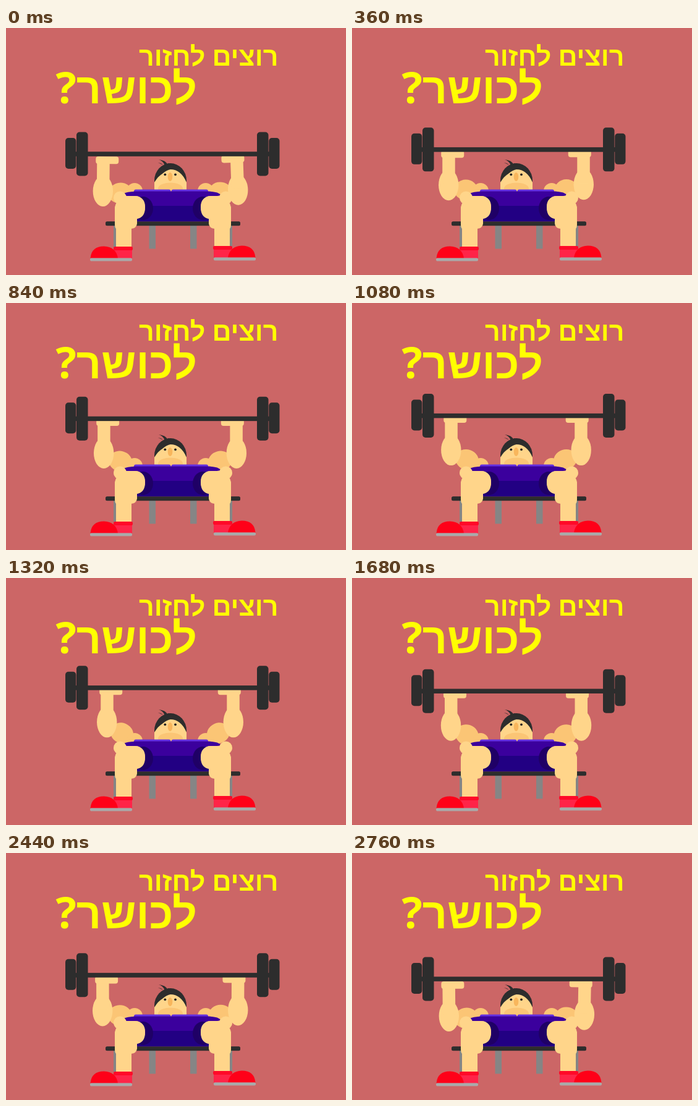
An HTML page that plays this animation: 550x400 px, repeating every 2800 ms.

```html
<!DOCTYPE html>
<html lang="he">
<head>
<meta charset="utf-8">
<style>
html, body { margin: 0; width: 100%; height: 100%; overflow: hidden; background: #c66; }
svg { display: block; width: 550px; height: 400px; }
text { font-family: "Open Sans", "Noto Sans", sans-serif; font-weight: 700; fill: #ff0; direction: rtl; }
.light { fill: #ffd58a; }
.tan { fill: #fbc575; }
.iron { fill: #2d2d2d; }
.steel { fill: #858585; }
</style>
</head>
<body>
<svg viewBox="0 0 550 400">
  <defs>
    <g id="upper">
      <ellipse class="tan bicep" rx="19" ry="16.5"/>
      <circle class="tan" cx="208" cy="264" r="13"/>
    </g>
    <g id="leg">
      <ellipse cx="221.5" cy="292" rx="16.5" ry="19" fill="#1f0066"/>
      <ellipse class="tan" cx="210" cy="290.5" rx="15" ry="18.5"/>
      <circle class="light" cx="184.5" cy="275" r="10.5"/>
      <path class="light" d="M190 272H208Q225 273 225 290Q225 307 212 309V317Q211 324 203 325V357H178V325Q176 323 176 318V290Q178 280 186 277Z"/>
    </g>
    <g id="foot">
      <rect x="176" y="357" width="28" height="16" fill="#ff2448"/>
      <rect x="174" y="354" width="31" height="6" rx="2" fill="#ff0a28"/>
      <path d="M136.5 373Q138 353.500 158.500 353.500Q178 354 181 373Z" fill="#ff0018"/>
      <rect x="136" y="372.500" width="68" height="5" rx="2" fill="#aaa"/>
    </g>
    <g id="plates" class="iron">
      <rect x="96" y="-26" width="17.300" height="50" rx="5"/>
      <rect x="114" y="-35.500" width="18.500" height="71" rx="5"/>
    </g>
    <g id="post" class="steel">
      <rect x="231.500" y="318" width="10.500" height="39.500"/>
      <rect x="174" y="318" width="10" height="39.500"/>
    </g>
  </defs>

  <rect width="550" height="400" fill="#c66"/>
  <text x="440.500" y="61" font-size="43">רוצים לחזור</text>
  <text x="309" y="121.500" font-size="70">לכושר?</text>

  <use href="#post"/>
  <use href="#post" transform="translate(540) scale(-1 1)"/>

  <g id="arms"></g>

  <g id="head">
    <ellipse class="iron" cx="266" cy="247" rx="26" ry="28"/>
    <path class="iron" d="M254 222Q251 218 246 218.500Q252 220 255 223ZM262 222Q258 214 247 213Q255 216 257 223L272 222Q267 219 262 219Z"/>
    <path class="light" d="M240 250Q246 240 253 236Q260 230 266 229Q283 229 292 250V268H240Z"/>
    <ellipse class="tan" cx="266" cy="260" rx="20" ry="9.500"/>
    <ellipse cx="265.500" cy="241" rx="3.800" ry="7" fill="#f8b65c"/>
    <circle cx="257.300" cy="237.300" r="1.900" fill="#222"/>
    <circle cx="274" cy="237.300" r="1.900" fill="#222"/>
  </g>

  <rect class="iron" x="161" y="313.300" width="218" height="7" rx="2.500"/>
  <path d="M190 268Q198 264.500 210 265H330Q344 265 348 271Q335 272 330 280V313H210V280Q205 272 190 272Z" fill="#3b009d"/>
  <rect x="210" y="288" width="120" height="25.300" fill="#220083"/>
  <rect x="207" y="261.500" width="59.500" height="6" rx="3" fill="#6530e0"/>
  <rect x="267.500" y="261.500" width="59.500" height="6" rx="3" fill="#6530e0"/>
  <path d="M200 267Q203 264.500 208 264.500H329Q337 265 340 269H200Z" fill="#3b009d"/>

  <use href="#leg"/>
  <use href="#leg" transform="translate(540) scale(-1 1)"/>
  <use href="#foot"/>
  <use href="#foot" transform="translate(540 -1) scale(-1 1)"/>

  <g id="fore"></g>

  <g id="bar">
    <rect class="iron" x="110" y="-3.700" width="318" height="7.500"/>
    <use href="#plates"/>
    <use href="#plates" transform="translate(538.500) scale(-1 1)"/>
  </g>
</svg>
<script>
const NS = "http://www.w3.org/2000/svg";
const STEP = 40, COUNT = 70, TOP = 34, LIFT = 27;
const byId = id => document.getElementById(id);

function add(parent, tag, attrs) {
  const el = document.createElementNS(NS, tag);
  for (const k in attrs) el.setAttribute(k, attrs[k]);
  return parent.appendChild(el);
}

function makeArm(mirror) {
  const flip = mirror ? { transform: "translate(531) scale(-1 1)" } : {};
  const back = add(byId("arms"), "g", flip);
  const bicep = add(back, "ellipse", { class: "tan", rx: 19, ry: 16.5 });
  add(back, "circle", { class: "tan", cx: 208, cy: 264, r: 13 });
  const front = add(add(byId("arms"), "g", flip), "g", { class: "light" });
  add(front, "ellipse", { rx: 16.2, ry: 25 });
  add(front, "rect", { x: -10, y: -52, width: 20.5, height: 50, rx: 2 });
  add(front, "rect", { x: -12, y: -56, width: 37, height: 12, rx: 4 });
  return { bicep, front };
}

function poseArm(arm, x, y, turn) {
  arm.front.setAttribute("transform", `translate(${x} ${y}) rotate(${turn})`);
  // The upper arm points from the shoulder to the elbow.
  const dx = x + 2 - 208, dy = y + 8 - 262;
  const tilt = Math.atan2(dy, dx) * 180 / Math.PI;
  arm.bicep.setAttribute("transform",
    `translate(${208 + dx * 0.48} ${262 + dy * 0.52}) rotate(${tilt})`);
}

const left = makeArm(false), right = makeArm(true);
byId("upper").remove();
byId("fore").remove();

function draw(time) {
  const n = Math.floor(time / STEP) % COUNT;
  const h = LIFT * (n < TOP ? n / TOP : (COUNT - 1 - n) / (COUNT - 1 - TOP));
  const barY = 204 - h;
  const x = 156.2 + 0.0172 * (h - 6) ** 2;
  const sag = Math.max(0, 1 - h / 20) ** 2;
  const start = Math.max(0, 1 - n / 9);
  const end = Math.max(0, (n - 53) / 16) ** 2;
  byId("bar").setAttribute("transform", `translate(0 ${barY})`);
  poseArm(left, x, barY + 55.5 + 4.5 * sag, 0.5 * start - 0.5 * end);
  poseArm(right, x - start - 1.7 * end, barY + 55.5 + 2.2 * sag, 2 * start - end);
}

const begin = performance.now();
function tick() {
  draw(performance.now() - begin);
  requestAnimationFrame(tick);
}
draw(0);
tick();
</script>
</body>
</html>
```
